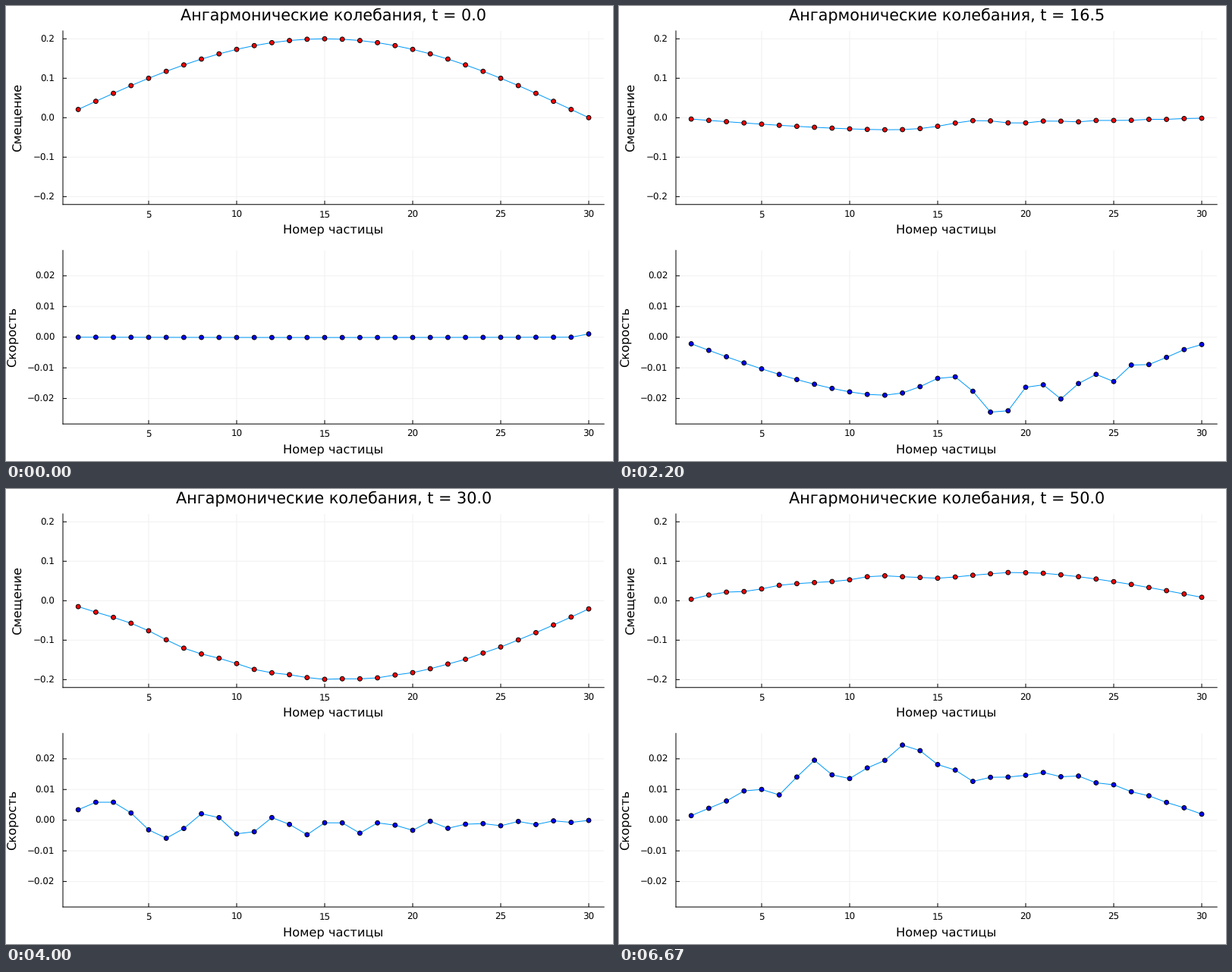
Recreate the animation shown at these times as a matplotlib script. Size 800 by 600 pixels, loop 6740 ms.

```python
import matplotlib.pyplot as plt
import numpy as np
from matplotlib.animation import FuncAnimation

W, H, DPI = 800, 600, 100
PX = 72 / DPI                      # points per pixel
N, STATES = 30, 101
LOOP, INTERVAL = 6740, 20          # ms
FPS = 15                           # chain states shown per second
LEAD = 14                          # ms, keeps changes on the 20 ms raster
DT, STEPS = 0.05, 10               # time step, steps per state
LEFT, RIGHT, HALF = 75, 788.2, 114.45

plt.rcParams.update({"font.family": "DejaVu Sans", "text.hinting": "none",
                     "path.snap": False})


def simulate():
    """Chain of particles between fixed walls, semi-implicit Euler."""
    num = np.arange(1, N + 1)
    u = 0.2 * np.sin(np.pi * num / N)
    v = np.zeros(N)
    states = []
    for step in range((STATES - 1) * STEPS + 1):
        chain = np.concatenate(([0], u, [0]))
        v = v + DT * (chain[2:] - 2 * u + chain[:-2])
        u = u + DT * v
        if step % STEPS == 0:
            states.append((u, v))
    return num, states


num, states = simulate()
fig = plt.figure(figsize=(W / DPI, H / DPI), dpi=DPI, facecolor="white")


def label(x, y, text, size, ha="center", **kw):
    """Text with its baseline at pixel (x, y), y counted from the top."""
    return fig.text(x / W, 1 - y / H, text, fontsize=size * PX,
                    ha=ha, va="baseline", color="black", **kw)


def panel(mid, limit, ticks, fmt, name, name_x, color):
    ax = fig.add_axes([LEFT / W, 1 - (mid + HALF) / H,
                       (RIGHT - LEFT) / W, 2 * HALF / H])
    x0, x1 = 0.13, 30.87
    ax.set_xlim(x0, x1)
    ax.set_ylim(-limit, limit)
    ax.set_facecolor("none")
    ax.spines[["top", "right"]].set_visible(False)
    ax.spines[["left", "bottom"]].set_linewidth(PX)

    xticks = range(5, 31, 5)
    ax.set_xticks([])
    ax.set_yticks([])
    ax.vlines(xticks, -limit, limit, color="0.945", lw=PX, zorder=0)
    ax.hlines(ticks, x0, x1, color="0.945", lw=PX, zorder=0)
    ax.vlines(xticks, -limit, -limit * (1 - 5 / HALF), color="black", lw=PX)
    ax.hlines(ticks, x0, x0 + 5 * (x1 - x0) / (RIGHT - LEFT),
              color="black", lw=PX)

    for x in xticks:
        label(72 + 23.2 * x, mid + 131.6, str(x), 11.87)
    for y in ticks:
        text = fmt.format(y).replace("-", "\u2212")
        label(64.3, mid - y / limit * HALF + 4.4, text, 11.87, ha="right")
    label(431.6, mid + 153.8, "Номер частицы", 16.3)
    label(name_x, mid, name, 16.3, rotation=90, rotation_mode="anchor")

    line, = ax.plot([], [], color="#009AF9", linewidth=PX, zorder=3)
    dots = ax.scatter(num, np.zeros(N), s=(5.8 * PX) ** 2, c=[color] * N,
                      edgecolors="black", linewidths=PX, zorder=4)
    return line, dots


title = label(432, 18.2, "", 20.8)
shift = panel(147.3, 0.22, np.arange(-2, 3) / 10, "{:.1f}",
              "Смещение", 21, "#FF0000")
speed = panel(436.7, 0.0283, np.arange(-2, 3) / 100, "{:.2f}",
              "Скорость", 13.5, "#0000FF")


def draw(i):
    k = min((i * INTERVAL + LEAD) * FPS // 1000, STATES - 1)
    title.set_text(f"Ангармонические колебания, t = {k * DT * STEPS:.1f}")
    for (line, dots), y in zip((shift, speed), states[k]):
        line.set_data(num, y)
        dots.set_offsets(np.column_stack((num, y)))
    return title, *shift, *speed


anim = FuncAnimation(fig, draw, frames=LOOP // INTERVAL,
                     init_func=lambda: draw(0), interval=INTERVAL,
                     repeat=True, blit=False)
plt.show()
```
